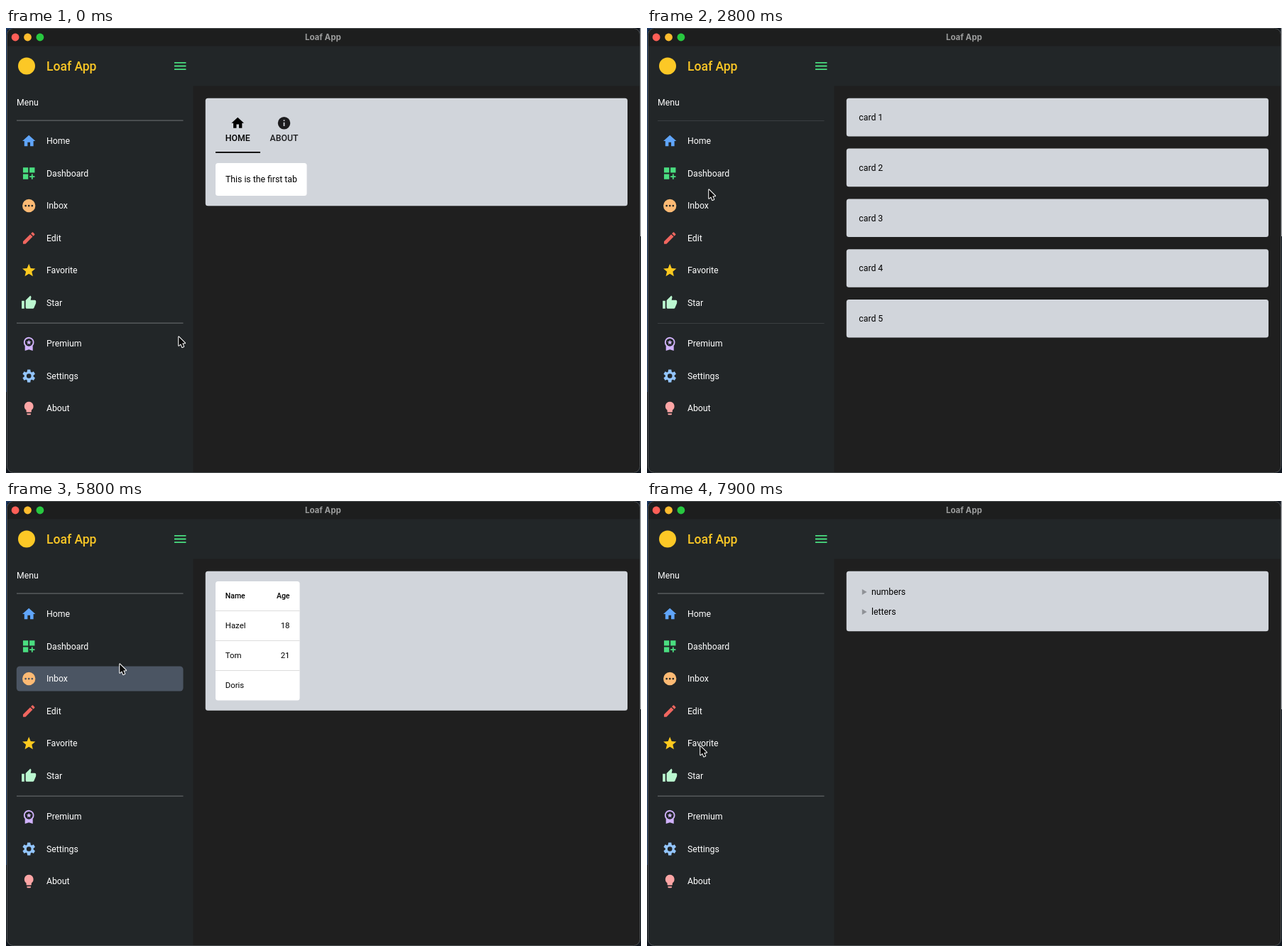
An HTML page with a canvas that plays this animation: 894 by 626 pixels, repeating every 8 s.

```html
<!DOCTYPE html>
<html lang="en">
<head>
<meta charset="utf-8">
<title>Loaf App</title>
<style>
html, body { margin: 0; width: 100%; height: 100%; overflow: hidden; background: #1f1f1f; }
canvas { display: block; width: 894px; height: 626px; }
</style>
</head>
<body>
<canvas id="stage" width="894" height="626"></canvas>
<script>
const ctx = document.getElementById('stage').getContext('2d');
const LOOP = 8000, STEP = 100;
const SIDE = '#222628', MAIN = '#1f1f1f', CARD = '#d1d5db', HOVER = '#4b5563', YELLOW = '#fcc826';

// icon outlines on a 24-unit grid
const ring = (x, y, r) => `M${x - r} ${y}a${r} ${r} 0 1 0 ${2 * r} 0 ${r} ${r} 0 1 0 ${-2 * r} 0z`;
const rect = (x, y, w, h) => `M${x} ${y}h${w}v${h}h${-w}z`;

// closed outline around a centre; at(i) gives [angle, radius]
function spokes(n, x, y, at) {
  const pts = Array.from({ length: n }, (_, i) => {
    const [a, r] = at(i);
    return `${x + r * Math.sin(a)} ${y - r * Math.cos(a)}`;
  });
  return 'M' + pts.join('L') + 'z';
}
const star = (x, y, r) => spokes(10, x, y, i => [i * Math.PI / 5, i % 2 ? r * .45 : r]);
const cog = i => {
  const k = i % 4, tip = k === 1 || k === 2;
  return [(i - k) / 4 * Math.PI / 3 + (k < 2 ? -1 : 1) * (tip ? .23 : .4), tip ? 10 : 7];
};

const ICON = {
  home: 'M10 20v-6h4v6h5v-8h3L12 3 2 12h3v8z',
  dash: rect(3, 3, 8, 8) + rect(13, 3, 8, 8) + rect(3, 13, 8, 8) +
    rect(16, 13, 2, 3) + rect(13, 16, 8, 2) + rect(16, 18, 2, 3),
  dots: ring(12, 12, 10) + [7, 12, 17].map(x => ring(x, 12, 1.5)).join(''),
  edit: 'M3 17.2V21h3.8L17.8 9.9 14 6.2zM20.7 7a1 1 0 0 0 0-1.4l-2.3-2.3a1 1 0 0 0-1.4 0l-1.9 1.8 3.8 3.8z',
  star: star(12, 12.5, 10.5),
  thumb: rect(1, 9, 4, 12) + 'M23 10a2 2 0 0 0-2-2h-6.3l1-4.9L14.2 1 7.6 7.6A2 2 0 0 0 7 9v10a2 2 0 0 0 2 2h9a2 2 0 0 0 1.8-1.2l3-7z',
  badge: 'M20 10a8 8 0 1 0-14 5.3V23l6-2 6 2v-7.7a8 8 0 0 0 2-5.3z' + ring(12, 10, 6) + star(12, 10.2, 4),
  gear: spokes(24, 12, 12, cog) + ring(12, 12, 3.6),
  bulb: 'M9 20v1a1 1 0 0 0 1 1h4a1 1 0 0 0 1-1v-1zM12 2a7 7 0 0 0-4 12.7V17a1 1 0 0 0 1 1h6a1 1 0 0 0 1-1v-2.3A7 7 0 0 0 12 2z',
  info: ring(12, 12, 10) + rect(11, 11, 2, 6) + rect(11, 7, 2, 2),
  menu: [6, 11, 16].map(y => rect(3, y, 18, 2)).join('')
};
for (const k in ICON) ICON[k] = new Path2D(ICON[k]);

const ITEMS = [
  ['Home', 'home', '#60a5fa'], ['Dashboard', 'dash', '#4ade80'], ['Inbox', 'dots', '#fdba74'],
  ['Edit', 'edit', '#f0665f'], ['Favorite', 'star', '#fcc91f'], ['Star', 'thumb', '#bbf7d0'],
  ['Premium', 'badge', '#d0b2fb'], ['Settings', 'gear', '#93c5fd'], ['About', 'bulb', '#fca5a5']
];
const rowY = i => 159 + 45.5 * i + (i > 5 ? 12 : 0);

// pointer moves: start, end, x, y
const MOVES = [
  [0, 400, 24, 28], [400, 600, 52, 58], [700, 1300, 72, 158], [1300, 1700, 80, 168],
  [1800, 2100, 77, 194], [2300, 2500, 83, 206], [2500, 2700, 86, 227], [2800, 3500, 76, 245],
  [3900, 4700, 75, 290], [5000, 5600, 156, 243], [5700, 5800, 159, 229],
  [5800, 6400, 387, 142], [6600, 7500, 74, 344.5]
];

// load time, page, time until the dividers turn bright
const PAGES = [
  [0, tabs, 0], [2200, cards, 700], [3900, tabs, 100],
  [5000, table, 100], [5900, tabs, 100], [7800, tree, 100]
];
const PRESS = 6450;

const clamp = v => Math.max(0, Math.min(1, v));
const easeOut = p => 1 - (1 - p) ** 3;
const easeBoth = p => p * p * (3 - 2 * p);

function pointer(t) {
  let x = 242, y = 434;
  for (const [a, b, tx, ty] of MOVES) {
    const p = easeBoth(clamp((t - a) / (b - a)));
    x += (tx - x) * p;
    y += (ty - y) * p;
  }
  return [x, y];
}

function box(x, y, w, h, r, fill) {
  ctx.fillStyle = fill;
  ctx.beginPath();
  ctx.roundRect(x, y, w, h, r);
  ctx.fill();
}

function disc(x, y, r, fill) {
  ctx.fillStyle = fill;
  ctx.beginPath();
  ctx.arc(x, y, r, 0, 7);
  ctx.fill();
}

function shape(pts) {
  ctx.beginPath();
  for (const p of pts) ctx.lineTo(...p);
  ctx.closePath();
}

// y is the middle of the capitals
function text(s, x, y, color, size = 12.25, weight = 400, align = 'left', face = 'Roboto') {
  ctx.font = `${weight} ${size}px ${face}, sans-serif`;
  ctx.textAlign = align;
  ctx.fillStyle = color;
  ctx.fillText(s, x, y + size * .355);
}

function icon(name, x, y, color, size) {
  ctx.save();
  ctx.translate(x - size / 2, y - size / 2);
  ctx.scale(size / 24, size / 24);
  ctx.fillStyle = color;
  ctx.fill(ICON[name], 'evenodd');
  ctx.restore();
}

const card = (y, h) => box(280.8, y - .2, 594.2, h + .4, 3.5, CARD);

function tab(label, name, x, color) {
  icon(name, x, 133.7, color, 21);
  text(label, x, 155, color, 12.25, 500, 'center');
}

function tabs(t) {
  const second = t >= PRESS && t < LOOP;
  const slide = easeOut(clamp((t - PRESS) / 300));
  const bar = easeBoth(clamp((t - PRESS - 25) / 250));
  const dim = '#1c1c1e';
  card(99, 151);
  const [x, y] = pointer(t);
  if (x > 358 && x < 425 && y > 113 && y < 176) box(358, 113, 67.5, 63, 3.5, second ? '#9d9ea0' : '#b4b7bc');
  tab('HOME', 'home', 326.2, second ? dim : '#000');
  tab('ABOUT', 'info', 391.5, second ? '#000' : dim);
  ctx.fillStyle = '#000';
  ctx.fillRect(295 + 63 * bar, 174, 63 + 4.5 * bar, 1.8);

  const w = second ? 147 : 128.5;
  box(295, 190, w, 46, 3.5, '#fff');
  ctx.save();
  ctx.beginPath();
  ctx.rect(295, 190, w, 46);
  ctx.clip();
  text('This is the first tab', 309 - w * slide, 212.7, '#000');
  if (second) text('This is the second tab', 309 + w * (1 - slide), 212.7, '#000');
  ctx.restore();
}

function cards() {
  for (let i = 0; i < 5; i++) {
    const y = 99 + 70.8 * i;
    card(y, 53.2);
    text('card ' + (i + 1), 298.3, y + 26.6, '#000');
  }
}

function table() {
  card(99, 195.5);
  box(295, 113, 118.5, 167.5, 3.5, '#fff');
  const rows = [['Name', 'Age'], ['Hazel', '18'], ['Tom', '21'], ['Doris', '']];
  rows.forEach(([name, age], i) => {
    const y = 133.3 + 42 * i, size = i ? 11.375 : 10.5, weight = i ? 400 : 500;
    text(name, 308.8, y, '#000', size, weight);
    text(age, 399.5, y, '#000', size, weight, 'right');
    ctx.fillStyle = '#dcdcdc';
    if (i) ctx.fillRect(295, 112 + 42 * i, 118.5, 1);
  });
}

function tree() {
  card(99, 84);
  ['numbers', 'letters'].forEach((s, i) => {
    const y = 128 + 28 * i;
    shape([[302.8, y - 4], [309.6, y], [302.8, y + 4]]);
    ctx.fillStyle = '#8f9297';
    ctx.fill();
    text(s, 316, y, '#000');
  });
}

function frame() {
  ctx.fillStyle = '#121820';
  ctx.fillRect(0, 0, 894, 626);
  ctx.fillStyle = '#1e3a63';
  ctx.fillRect(0, 0, 2, 512);
  ctx.fillRect(0, 0, 110, 2);
  ctx.fillStyle = '#b4b6b8';
  ctx.fillRect(892.7, 0, 1.3, 293);

  ctx.save();
  ctx.beginPath();
  ctx.roundRect(1, .5, 891.5, 625, 9);
  ctx.fillStyle = MAIN;
  ctx.fill();
  ctx.clip();
  ctx.fillStyle = '#1d1e1e';
  ctx.fillRect(0, 0, 894, 25.5);
  ctx.fillStyle = SIDE;
  ctx.fillRect(0, 25.5, 894, 56);
  ctx.fillRect(0, 81, 263.5, 545);
  ctx.restore();
  ctx.strokeStyle = '#4c5052';
  ctx.lineWidth = 1;
  ctx.beginPath();
  ctx.roundRect(1.5, .5, 891, 625, 9);
  ctx.stroke();

  ['#ff5f57', '#febc2e', '#28c840'].forEach((c, i) => disc(13.1 + 17.4 * i, 13, 5.4, c));
  text('Loaf App', 446.3, 13, '#9b9c9c', 11.5, 700, 'center', 'Inter');
  disc(29, 53.6, 12, YELLOW);
  text('Loaf App', 57, 53.8, YELLOW, 17.5, 500);
  icon('menu', 245.2, 53.5, '#4ade80', 22);
}

function sidebar(t, age, settle) {
  text('Menu', 15, 104.3, '#fff');
  const thin = age < settle;
  ctx.fillStyle = thin ? '#3a3e41' : '#505456';
  for (const y of [130, 415]) ctx.fillRect(15, thin ? y : y - .7, 234.5, thin ? 1 : 1.7);

  // hover lags the pointer by one step and is lost while a page loads
  const [x, y] = pointer(t - STEP);
  const live = t > 700 && age > STEP && x > 15 && x < 249;
  ITEMS.forEach(([label, name, tint], i) => {
    const cy = rowY(i);
    if (live && Math.abs(y - cy) <= 17.5) box(14.8, cy - 17.5, 234.7, 35, 4.5, HOVER);
    icon(name, 32.2, cy, tint, 22);
    text(label, 57, cy, '#fff');
  });
}

function arrow([x, y]) {
  ctx.save();
  ctx.translate(x + 1.2, y + .4);
  shape([[0, 0], [0, 12.4], [2.9, 9.8], [4.9, 14.6], [7, 13.7], [5, 9], [8.8, 8.9]]);
  ctx.lineJoin = 'round';
  ctx.lineWidth = 2;
  ctx.strokeStyle = '#fff';
  ctx.stroke();
  ctx.fillStyle = '#0a0a0a';
  ctx.fill();
  ctx.restore();
}

function draw(t) {
  const [load, page, settle] = PAGES.filter(p => p[0] <= t).pop();
  frame();
  sidebar(t, t - load, settle);
  page(t);
  arrow(pointer(t));
}

let start = null;
function tick(now) {
  if (start === null) start = now;
  draw(Math.floor(((now - start) % LOOP) / STEP) * STEP);
  requestAnimationFrame(tick);
}
draw(0);
requestAnimationFrame(tick);
</script>
</body>
</html>
```
